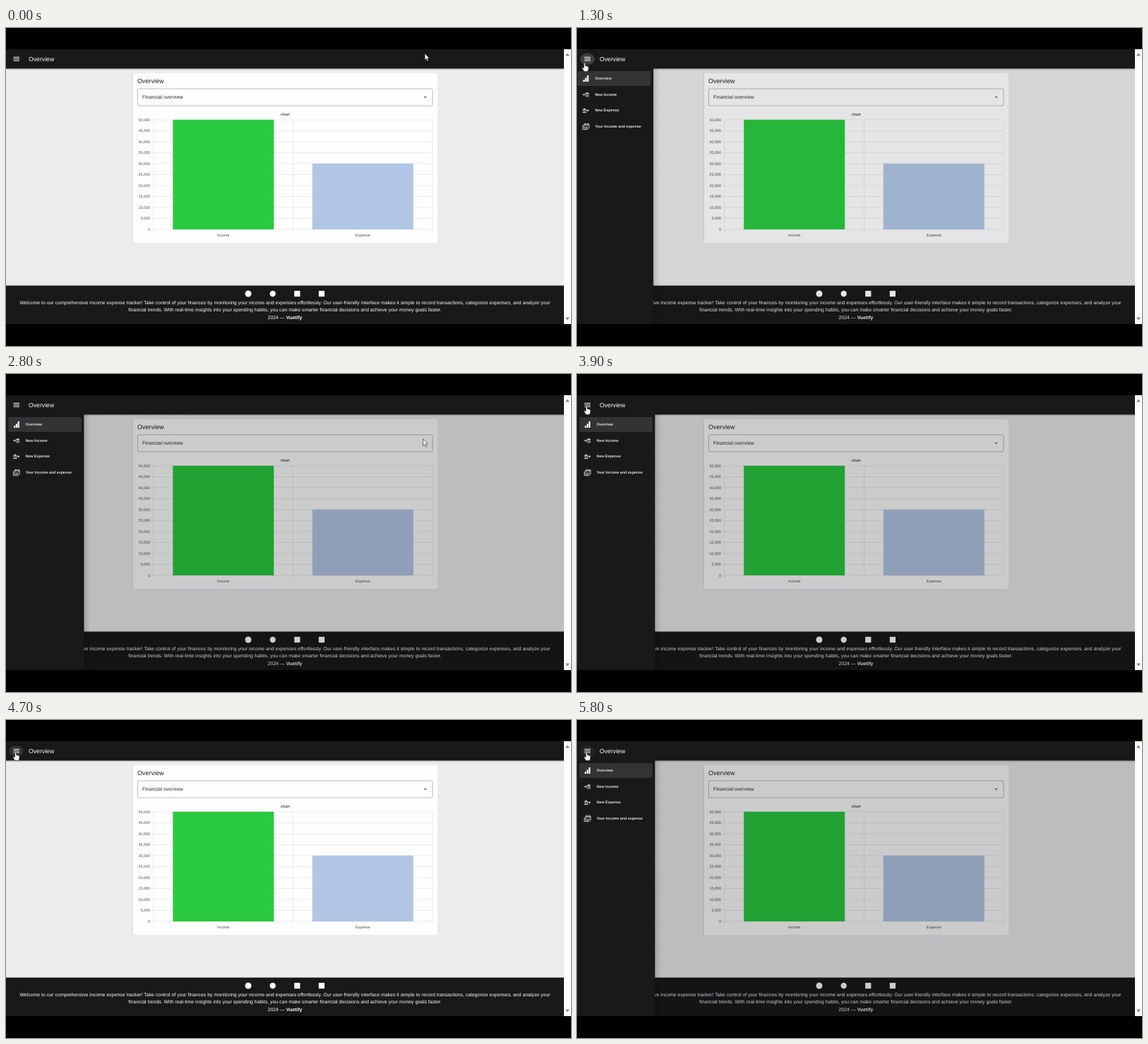
Animation of 800x450 px, one loop 6 s. Source, as an HTML page:

```html
<!DOCTYPE html>
<html lang="en">
<head>
<meta charset="utf-8">
<title>Overview</title>
<style>
  html, body { margin: 0; width: 100%; height: 100%; overflow: hidden; background: #000; }
  svg { display: block; width: 100vw; height: 100vh; }
  text { font-family: "Liberation Sans", Arial, sans-serif; text-rendering: geometricPrecision; white-space: pre; }
  .mid { text-anchor: middle; }
  .end { text-anchor: end; }
  .bold { font-weight: 700; }
  .chart { font-size: 5.4px; fill: #4c4c4e; }
  .footer { font-size: 6.92px; fill: #fff; }
  .item { font-size: 5.3px; font-weight: 700; fill: #e6e6e8; }
  .card { filter: drop-shadow(0 .5px .6px #0006); }
  .dark { fill: #19181b; }
</style>
</head>
<body>
<svg viewBox="0 0 800 450">
  <defs>
    <clipPath id="page"><rect y="30" width="790" height="389"/></clipPath>
    <linearGradient id="drop" x2="0" y2="1">
      <stop stop-opacity=".2"/><stop offset="1" stop-opacity="0"/>
    </linearGradient>
    <linearGradient id="side">
      <stop stop-opacity=".14"/><stop offset="1" stop-opacity="0"/>
    </linearGradient>
    <g id="bank">
      <path d="M0 -1.6L2.7 -3.2 5.4 -1.6V-1H0ZM0 2.2H5.4V3.1H0Z"/>
      <path d="M1 -.6V1.8M2.7 -.6V1.8M4.4 -.6V1.8" stroke="#fff" stroke-width=".8"/>
    </g>
    <path id="arrow" d="M0 -.5H2V-1.8L4 0 2 1.8V.5H0Z"/>
  </defs>
  <rect width="800" height="450"/>

  <g clip-path="url(#page)">
    <rect y="57" width="790" height="308" fill="#ecebed"/>
    <rect class="card" x="179.5" y="64" width="431.5" height="240" rx="1.5" fill="#fefdff"/>
    <text x="186" y="77.6" font-size="9" fill="#1c1c1e">Overview</text>
    <rect x="186.4" y="86" width="417.6" height="24" rx="2" fill="none" stroke="#aaa9ac" stroke-width=".8"/>
    <text x="193" y="100.4" font-size="7" fill="#2c2c2e">Financial overview</text>
    <path d="M591.3 97H595.9L593.6 99.3Z" fill="#666568"/>
    <g id="chart">
      <text class="chart mid bold" x="395.3" y="124.4">chart</text>
    </g>
    <g>
      <rect class="dark" y="364.5" width="790" height="55"/>
      <g fill="#fff">
        <circle cx="343" cy="376" r="4.5"/>
        <circle cx="377.7" cy="376" r="4.2"/>
        <rect x="408.2" y="371.9" width="8.2" height="8.2"/>
        <rect x="442.8" y="371.9" width="8.2" height="8.2"/>
      </g>
      <text class="footer mid" x="395" y="390.9">Welcome to our comprehensive income expense tracker! Take control of your finances by monitoring your income and expenses effortlessly. Our user-friendly interface makes it simple to record transactions, categorize expenses, and analyze your</text>
      <text class="footer mid" x="395" y="401.3">financial trends. With real-time insights into your spending habits, you can make smarter financial decisions and achieve your money goals faster.</text>
      <text class="footer mid" x="395" y="412.1">2024 — <tspan class="bold">Vuetify</tspan></text>
    </g>
    <rect id="scrim" y="57" width="790" height="362"/>
    <rect y="57.5" width="790" height="2.5" fill="url(#drop)"/>

    <g id="drawer">
      <rect id="shade" x="110.5" y="57" width="9" height="362" fill="url(#side)"/>
      <rect class="dark" y="57" width="110.5" height="362"/>
      <rect x="3.3" y="61" width="103.5" height="21" rx="2" fill="#333235"/>
      <g fill="#fff">
        <path d="M11 73.2H13.2V76H11ZM13.8 70.6H16V76H13.8ZM16.6 67H18.8V76H16.6Z"/>
        <g opacity=".85">
          <use href="#arrow" x="10" y="94.2"/><use href="#bank" x="14" y="94.2"/>
          <use href="#bank" x="10.2" y="116.8"/><use href="#arrow" x="15.4" y="116.8"/>
        </g>
      </g>
      <path d="M10.4 137.6V143.6H17.4M12.3 136H19.2V141.8H12.3ZM12.3 137H19.2M13.8 134.6V136M17.7 134.6V136M14 139.4L15.3 140.6 17.6 138.4" fill="none" stroke="#ddd" stroke-width=".9"/>
      <g id="items"></g>
    </g>

    <rect class="dark" y="30" width="790" height="27.5"/>
    <ellipse id="glow" cx="14.7" cy="44" rx="10.2" ry="8" fill="#fff"/>
    <path d="M10.5 41.4H19M10.5 43.8H19M10.5 46.2H19" stroke="#fff" stroke-width="1"/>
    <text x="32" y="46.9" font-size="8.7" fill="#fff">Overview</text>
  </g>

  <rect x="790" y="30" width="10" height="389" fill="#fcfbfd"/>
  <path d="M792 39.6L795 35.4 798 39.6ZM792 409.4L795 413.6 798 409.4Z" fill="#89888b"/>

  <g id="cursor" fill="#fff" stroke="#111" stroke-width=".6" stroke-linejoin="round">
    <path id="pointer" d="M0 0V9.4L2.1 7.5 3.6 10.9 5.1 10.2 3.6 6.9H6.6Z"/>
    <path id="hand" d="M-1 .9Q-1 0 0 0T1 .9V4.2Q2 3.7 2.6 4.6 3.7 4.1 4.2 5.1 5.5 4.8 5.6 6V8.5L4.4 12.2H-.8L-3.2 8.4Q-3.9 7.2 -2.9 6.7 -2 6.4 -1 7.6Z"/>
  </g>
</svg>
<script>
const LOOP = 6000, STEP = 100;
const DRAWER_WIDTH = 110.5, SLIDE = 200, FADE = 330, SCRIM = .2;
const CLICKS = [1137, 4386, 5320];

const $ = id => document.getElementById(id);
const clamp = x => Math.min(1, Math.max(0, x));
const smooth = x => x * x * (3 - 2 * x);

function add(parent, tag, attrs, content = '') {
  const node = document.createElementNS('http://www.w3.org/2000/svg', tag);
  for (const key in attrs) node.setAttribute(key, attrs[key]);
  node.textContent = content;
  parent.append(node);
}

function buildChart() {
  const chart = $('chart'), left = 209, right = 604, top = 130, bottom = 285;
  const max = 50000, slot = (right - left) / 2, width = 143;
  const grid = { stroke: '#e4e3e5', 'stroke-width': .7 };
  for (let i = 0; i <= 10; i++) {
    const y = bottom - (bottom - top) * i / 10;
    add(chart, 'path', { d: `M${left - 4} ${y}H${right}`, ...grid });
    add(chart, 'text', { class: 'chart end', x: 204, y: y + 1.9 }, (max * i / 10).toLocaleString('en-US'));
  }
  for (let i = 0; i <= 2; i++) add(chart, 'path', { d: `M${left + slot * i} ${top}V${bottom + 4}`, ...grid });
  [['Income', 50000, '#2aca40'], ['Expense', 30000, '#b1c6e4']].forEach(([label, value, fill], i) => {
    const x = left + slot * (i + .5), height = (bottom - top) * value / max + .2;
    add(chart, 'rect', { x: x - width / 2, y: bottom - height, width, height, fill });
    add(chart, 'text', { class: 'chart mid', x, y: 294.5 }, label);
  });
}

// Material standard curve, cubic-bezier(.4, 0, .2, 1), solved by bisection.
function standard(x) {
  let low = 0, high = 1;
  for (let i = 0; i < 20; i++) {
    const s = (low + high) / 2, r = 1 - s;
    if (1.2 * r * r * s + .6 * r * s * s + s ** 3 < x) low = s; else high = s;
  }
  return smooth(low);
}

// Every click reverses the previous state: open, close, open.
const toggled = (t, duration, ease) =>
  CLICKS.reduce((sum, at, i) => sum + (-1) ** i * ease(clamp((t - at) / duration)), 0);

// The button lights up at a press and fades out slowly.
const glow = t => Math.max(...CLICKS.map(at => t < at - 150 ? 0 : .25 * Math.exp(-Math.abs(t - at - 60) / 280)));

// Cursor stops as [ms, x, y], joined by straight moves.
const stops = [
  [0, 593, 36], [300, 370, 76], [700, 7, 53], [800, 10.8, 49.3], [1500, 10.8, 49.3],
  [2300, 453, 160], [2600, 770, 112], [2800, 590.5, 92], [3000, 228, 248],
  [3300, 412, 380], [3700, 18, 52], [3900, 13.5, 45.3], [LOOP, 13.5, 45.3]
];

function cursorAt(t) {
  const i = stops.findIndex(([at]) => at > t);
  const [t0, x0, y0] = stops[i - 1], [t1, x1, y1] = stops[i];
  const k = (t - t0) / (t1 - t0);
  return [x0 + (x1 - x0) * k, y0 + (y1 - y0) * k];
}

function draw(time) {
  const t = Math.floor(time % LOOP / STEP) * STEP;
  const open = toggled(t, SLIDE, standard);
  const [x, y] = cursorAt(t), hover = x < 25 && y < 51;
  $('drawer').setAttribute('transform', `translate(${DRAWER_WIDTH * (open - 1)})`);
  $('shade').setAttribute('opacity', open > .01 ? 1 : 0);
  $('scrim').setAttribute('opacity', SCRIM * toggled(t, FADE, smooth));
  $('glow').setAttribute('opacity', hover ? glow(t) : 0);
  $('cursor').setAttribute('transform', `translate(${x} ${y})`);
  $('hand').setAttribute('visibility', hover ? 'visible' : 'hidden');
  $('pointer').setAttribute('visibility', hover ? 'hidden' : 'visible');
}

buildChart();
['Overview', 'New Income', 'New Expense', 'Your Income and expense'].forEach((label, i) =>
  add($('items'), 'text', { class: 'item', x: 27.7, y: 73.3 + i * 22.55 }, label));

const start = performance.now();
function tick() {
  draw(performance.now() - start);
  requestAnimationFrame(tick);
}
tick();
</script>
</body>
</html>
```
